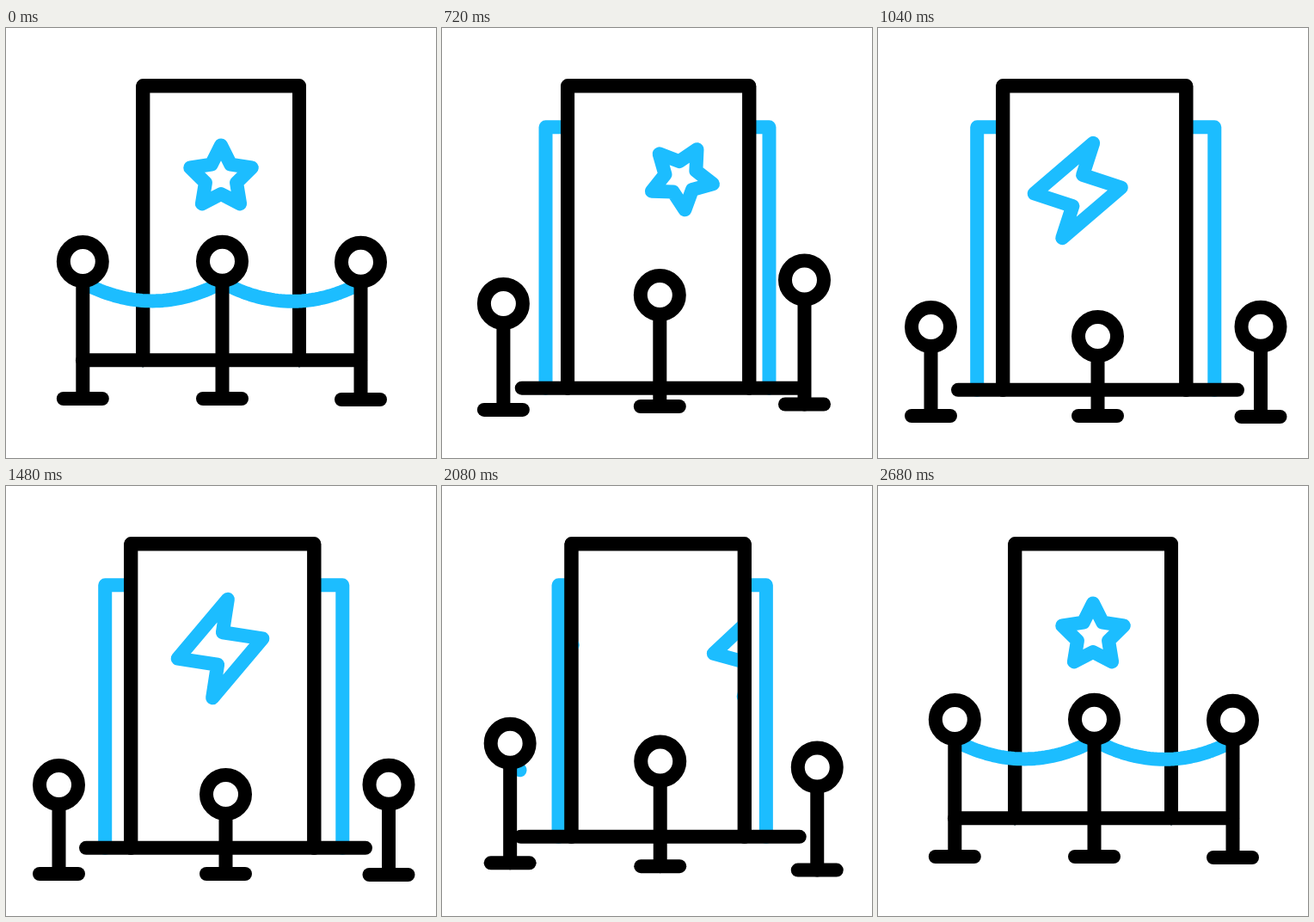
Animation of 500 by 500 pixels, one loop 2.8 s. Source, as an HTML page with a canvas:

```html
<!DOCTYPE html>
<html>
<head>
<meta charset="utf-8">
<style>
html, body { margin: 0; width: 100%; height: 100%; overflow: hidden; background: #fff; }
canvas { display: block; width: 100vmin; height: 100vmin; }
</style>
</head>
<body>
<canvas id="stage" width="500" height="500"></canvas>
<script>
const ctx = document.getElementById('stage').getContext('2d');
const LOOP = 2800, BLUE = '#1cbdff', BLACK = '#000';
const TRAVEL = 182, DEG = Math.PI / 180;

const mix = (a, b, p) => a + (b - a) * p;

function ease(time, start, duration = 580) {
  const p = Math.min(1, Math.max(0, (time - start) / duration));
  return p < 0.5 ? 4 * p ** 3 : 1 - 4 * (1 - p) ** 3;
}

// Rises from 0 to 1 at `open`, falls back at `close`.
const openness = (time, open, close, duration) =>
  ease(time, open, duration) - ease(time, close, duration);

function stroke(points, color, closed = false) {
  ctx.beginPath();
  points.forEach(([x, y]) => ctx.lineTo(x, y));
  if (closed) ctx.closePath();
  ctx.strokeStyle = color;
  ctx.stroke();
}

function frame(left, right, top, bottom, color) {
  ctx.fillStyle = '#fff';
  ctx.fillRect(left, top, right - left, bottom - top);
  stroke([[left, bottom], [left, top], [right, top], [right, bottom]], color);
}

const star = Array.from({ length: 10 }, (_, i) => {
  const radius = i % 2 ? 19 : 37.6, angle = i * 36 * DEG;
  return [radius * Math.sin(angle), -radius * Math.cos(angle)];
});
const bolt = [[0, -58], [-47, 19], [0, 19], [0, 58], [47, -19], [0, -19]];

function symbol(shape, x, y, degrees) {
  ctx.save();
  ctx.translate(x, y);
  ctx.rotate(degrees * DEG);
  stroke(shape, BLUE, true);
  ctx.restore();
}

function drawSymbols(time) {
  const starOut = ease(time, 525), starIn = ease(time, 1847);
  if (starOut < 1) symbol(star, 250 + TRAVEL * starOut, 174, 190 * starOut);
  else if (starIn > 0) symbol(star, 250 - TRAVEL * (1 - starIn), 174, -343 * (1 - starIn));

  const boltIn = ease(time, 626), boltOut = ease(time, 1760);
  if (boltIn > 0 && boltOut < 1) {
    const s = Math.min(1, Math.max(0, (time - 1180) / 580));
    const sway = mix(50, -28, s * s * (3 - 2 * s));
    symbol(bolt, 249 + TRAVEL * (boltIn - 1 + boltOut), 189,
      sway + 347 * (boltIn - 1 + boltOut));
  }
}

// Each pose is [x, ring y, base y].
const posts = [
  { rest: [89.3, 271.5, 431], away: [61.5, 347.5, 451], delay: 0 },
  { rest: [251.5, 271.3, 431], away: [255.5, 358.5, 451], delay: 41 },
  { rest: [412.5, 272.3, 432], away: [445, 347.3, 452], delay: 83 }
];

function drawPost([x, y, base]) {
  stroke([[x, y + 22], [x, base]], BLACK);
  stroke([[x - 22.5, base], [x + 22.5, base]], BLACK);
  ctx.beginPath();
  ctx.arc(x, y, 22.5, 0, 2 * Math.PI);
  ctx.fillStyle = '#fff';
  ctx.fill();
  ctx.stroke();
}

function ropePoint(poses, p) {
  const span = p < 0.5 ? 0 : 1, u = p * 2 - span;
  const [a, b] = [poses[span], poses[span + 1]];
  return [mix(a[0], b[0], u), mix(a[1], b[1], u) + 24.5 + 86 * u * (1 - u)];
}

function drawRope(poses, from, to) {
  if (to - from < 0.0005) return;
  const steps = 80;
  stroke(Array.from({ length: steps + 1 },
    (_, i) => ropePoint(poses, mix(from, to, i / steps))), BLUE);
}

function draw(time) {
  ctx.fillStyle = '#fff';
  ctx.fillRect(0, 0, 500, 500);
  ctx.lineWidth = 16;
  ctx.lineCap = ctx.lineJoin = 'round';

  const door = openness(time, 240, 1790, 640);
  const left = mix(159.2, 145.2, door), right = mix(341, 358.3, door);
  const floor = mix(386.3, 420.8, door);
  const backLeft = mix(159, 115.2, openness(time, 322, 1798));
  const backRight = mix(341, 391.3, openness(time, 360, 1840));

  frame(backLeft, backRight, 115.3, floor, BLUE);
  frame(left, right, 67.3, floor, BLACK);

  ctx.save();
  ctx.beginPath();
  ctx.rect(left, 67, right - left, floor - 67);
  ctx.clip();
  drawSymbols(time);
  ctx.restore();
  stroke([[left, floor], [left, 67.3], [right, 67.3], [right, floor]], BLACK);
  stroke([[mix(89, 93, door), floor], [mix(412, 418, door), floor]], BLACK);

  const poses = posts.map(({ rest, away, delay }) => {
    const p = openness(time, 400 + delay, 1762 + delay);
    return rest.map((v, i) => mix(v, away[i], p));
  });
  const ropeOut = ease(time, 38, 680), ropeIn = ease(time, 1944, 680);
  if (ropeOut < 1) drawRope(poses, ropeOut, 1);
  else drawRope(poses, 0, ropeIn);
  poses.forEach(drawPost);
}

const begin = performance.now();
function tick() {
  draw((performance.now() - begin) % LOOP);
  requestAnimationFrame(tick);
}
tick();
</script>
</body>
</html>
```
